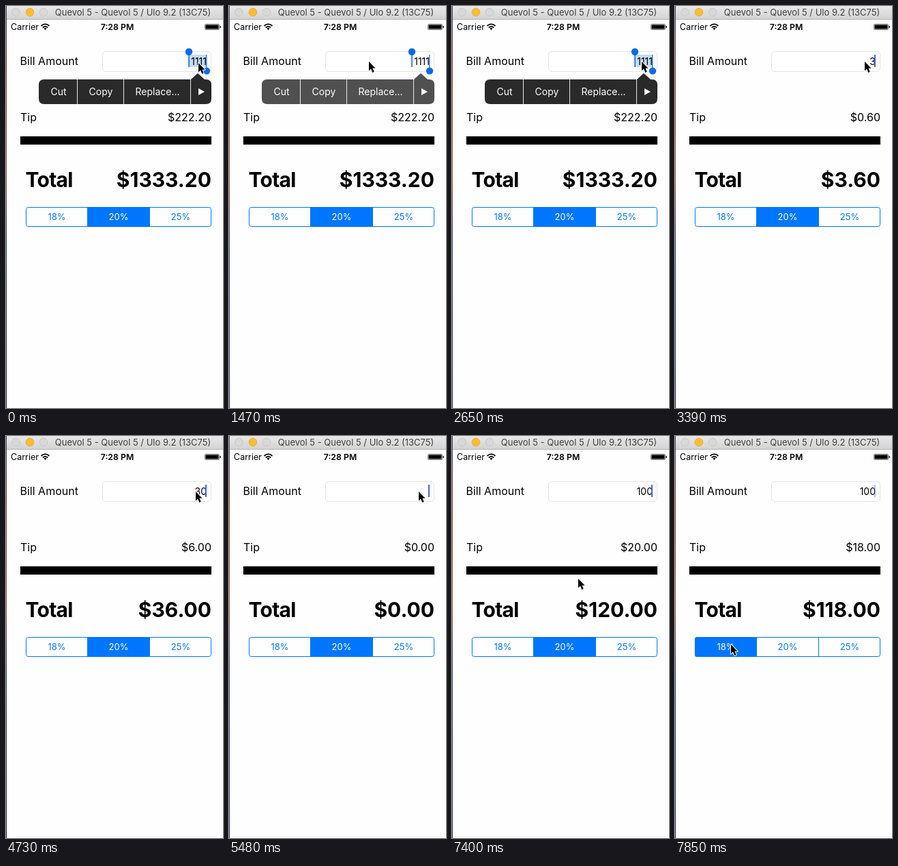
Write an HTML page that moves like this. It is 318 px wide and 586 px high and loops after 7990 ms.

```html
<!DOCTYPE html>
<html lang="en">
<head>
<meta charset="utf-8">
<title>Tip calculator</title>
<style>
  html, body { margin: 0; width: 100%; height: 100%; overflow: hidden; background: #fefefe; }
  svg { display: block; width: 318px; height: 586px; font-family: Inter, Roboto, sans-serif; }
  .end { text-anchor: end; }
  .mid { text-anchor: middle; }
  .body { font-size: 16px; }
  .big { font-size: 30px; font-weight: 700; }
  .small { font-size: 13px; }
  .menu { font-size: 14px; fill: #fff; }
</style>
</head>
<body>
<svg viewBox="0 0 318 586">
  <defs>
    <linearGradient id="bar" x2="0" y2="1">
      <stop stop-color="#e8e8e8"/><stop offset="1" stop-color="#d2d2d2"/>
    </linearGradient>
    <linearGradient id="desktop" x2="0" y2="1">
      <stop stop-color="#3c4a66"/><stop offset=".15" stop-color="#7d3a2e"/>
      <stop offset=".42" stop-color="#a4543c"/><stop offset=".58" stop-color="#2c3d62"/>
      <stop offset="1" stop-color="#1d2b4a"/>
    </linearGradient>
    <clipPath id="pill"><rect x="29" y="293" width="272" height="29" rx="3.5"/></clipPath>
  </defs>

  <rect width="318" height="586" fill="#fefefe"/>
  <rect x="1" width="317" height="20" fill="url(#bar)"/>
  <rect x="1" y="19" width="317" height="1" fill="#b4b4b4"/>
  <rect width="1" height="586" fill="url(#desktop)"/>
  <g stroke-width=".8">
    <circle cx="14.5" cy="9" r="5.8" fill="#d8d8d8" stroke="#c2c2c2"/>
    <circle cx="35" cy="9" r="5.8" fill="#ffbd2e" stroke="#e3a327"/>
    <circle cx="55" cy="9" r="5.8" fill="#d8d8d8" stroke="#c2c2c2"/>
  </g>
  <text class="small mid" x="186" y="14" fill="#404040">Quevol 5 - Quevol 5 / Ulo 9.2 (13C75)</text>

  <text x="7" y="35" font-size="12.5">Carrier</text>
  <g fill="none" stroke="#000" stroke-width="1.7">
    <path d="M51.5 29Q57.5 23.6 63.5 29M53.8 31.5Q57.5 28.2 61.2 31.5"/>
    <path d="M55.4 32.7Q57.5 31 59.6 32.7L57.5 35Z" fill="#000" stroke="none"/>
  </g>
  <text class="mid" x="163" y="35" font-size="12.3" font-weight="600">7:28 PM</text>
  <rect x="291.5" y="26.5" width="21" height="8" rx="1.5" fill="none" stroke="#777"/>
  <rect x="292.5" y="27.5" width="19" height="6" rx=".5"/>
  <rect x="313.5" y="29" width="1.5" height="3" rx=".7"/>

  <text class="body" x="20.5" y="86">Bill Amount</text>
  <rect x="141.5" y="66.5" width="159" height="29" rx="4.5" fill="#fff" stroke="#e4e4e4"/>
  <rect id="highlight" x="268" y="71" width="26" height="18" fill="#c3dbf3"/>
  <text id="bill" class="end" x="294" y="86" font-size="14"></text>
  <rect id="caret" x="292" y="71" width="2" height="18" fill="#4169ec"/>
  <g id="handles" fill="#0a6be8">
    <rect x="267.3" y="68" width="1.6" height="21"/><circle cx="268" cy="66.7" r="5.2"/>
    <rect x="293.2" y="71" width="1.2" height="20"/><circle cx="294" cy="94.6" r="5.2"/>
  </g>

  <g id="menu">
    <path d="M56 107H271L281 98L291 107H293Q301 107 301 115V135Q301 143 293 143H56Q48 143 48 135V115Q48 107 56 107Z" fill="#2a2a2a"/>
    <path d="M104.5 107V143M172.5 107V143M270.5 107V143" stroke="#e8e8e8"/>
    <text class="menu mid" x="77" y="130">Cut</text>
    <text class="menu mid" x="139" y="130">Copy</text>
    <text class="menu mid" x="222" y="130">Replace...</text>
    <path d="M282 120L291 125L282 130Z" fill="#fff"/>
  </g>

  <text class="body" x="21" y="168">Tip</text>
  <text id="tip" class="body end" x="301" y="168"></text>
  <rect x="21" y="190" width="280" height="12"/>
  <text class="big" x="28.5" y="263.5" letter-spacing="-.7">Total</text>
  <text id="total" class="big end" x="301" y="263.5"></text>

  <rect id="selected" y="293" width="91" height="29" fill="#0076ff" clip-path="url(#pill)"/>
  <path d="M119.5 293V322M210.5 293V322" stroke="#0076ff"/>
  <rect x="29.5" y="293.5" width="271" height="28" rx="3" fill="none" stroke="#0076ff"/>
  <g id="rates" class="small mid">
    <text x="74.5" y="312.4">18%</text><text x="165" y="312.4">20%</text><text x="256" y="312.4">25%</text>
  </g>

  <path id="pointer" d="M0 0V13.4L3 10.6L5.3 15.9L7.7 14.8L5.5 9.7H9.6Z" stroke="#fff" stroke-width="2" stroke-linejoin="round" paint-order="stroke"/>
</svg>
<script>
const LOOP = 7990;
const RATES = [18, 20, 25];
const $ = id => document.getElementById(id);
const at = (x, y) => ({ x, y });

// Each row lists only what changes at that moment.
const steps = [
  [0, { ...at(282, 83), bill: "1111", menu: 1, handles: 1, highlight: 1, caret: 0, rate: 1 }],
  [890, at(275, 83)],
  [1040, at(251, 82)],
  [1180, at(221, 81)],
  [1330, at(205, 81)],
  [1470, { menu: .82, highlight: 0 }],
  [1620, { menu: .3 }],
  [1770, { menu: 0, handles: 0, caret: 1 }],
  [1920, at(211, 81)],
  [2060, at(239, 81)],
  [2210, at(267, 81)],
  [2360, at(278, 81)],
  [2500, { menu: .5, handles: 1, highlight: 1, caret: 0 }],
  [2650, { menu: 1 }],
  [3100, { bill: "3", menu: .85, highlight: 0, caret: 1 }],
  [3240, { menu: .35 }],
  [3390, { menu: 0, handles: 0 }],
  [3690, { caret: .4 }],
  [3840, { caret: 0 }],
  [4140, { caret: .5 }],
  [4290, { caret: 1 }],
  [4730, { bill: "30" }],
  [5180, { bill: "3" }],
  [5480, { bill: "" }],
  [5630, { bill: "1" }],
  [5780, { bill: "10" }],
  [5930, { bill: "100" }],
  [6380, { caret: .4 }],
  [6530, { caret: 0 }],
  [6960, { ...at(271, 93), caret: .5 }],
  [7110, { ...at(237, 143), caret: 1 }],
  [7260, at(185, 208)],
  [7410, { ...at(129, 265), caret: .6 }],
  [7550, { ...at(95, 297), caret: 0 }],
  [7700, at(82, 304)],
  [7850, { rate: 0, caret: .4 }]
];

let last = {};
const states = steps.map(([time, change]) => (last = { ...last, ...change, time }));
const money = value => "$" + value.toFixed(2);

function draw(state) {
  const bill = Number(state.bill);
  const tip = bill * RATES[state.rate] / 100;
  $("bill").textContent = state.bill;
  $("tip").textContent = money(tip);
  $("total").textContent = money(bill + tip);
  for (const id of ["menu", "handles", "highlight", "caret"]) $(id).style.opacity = state[id];
  $("selected").setAttribute("x", 29 + state.rate * 91);
  [...$("rates").children].forEach((label, i) =>
    label.setAttribute("fill", i === state.rate ? "#fff" : "#0076ff"));
  $("pointer").setAttribute("transform", `translate(${state.x} ${state.y})`);
}

let shown;
function tick() {
  const time = performance.now() % LOOP;
  const state = states.findLast(s => s.time <= time);
  if (state !== shown) draw(shown = state);
  requestAnimationFrame(tick);
}
tick();
</script>
</body>
</html>
```
